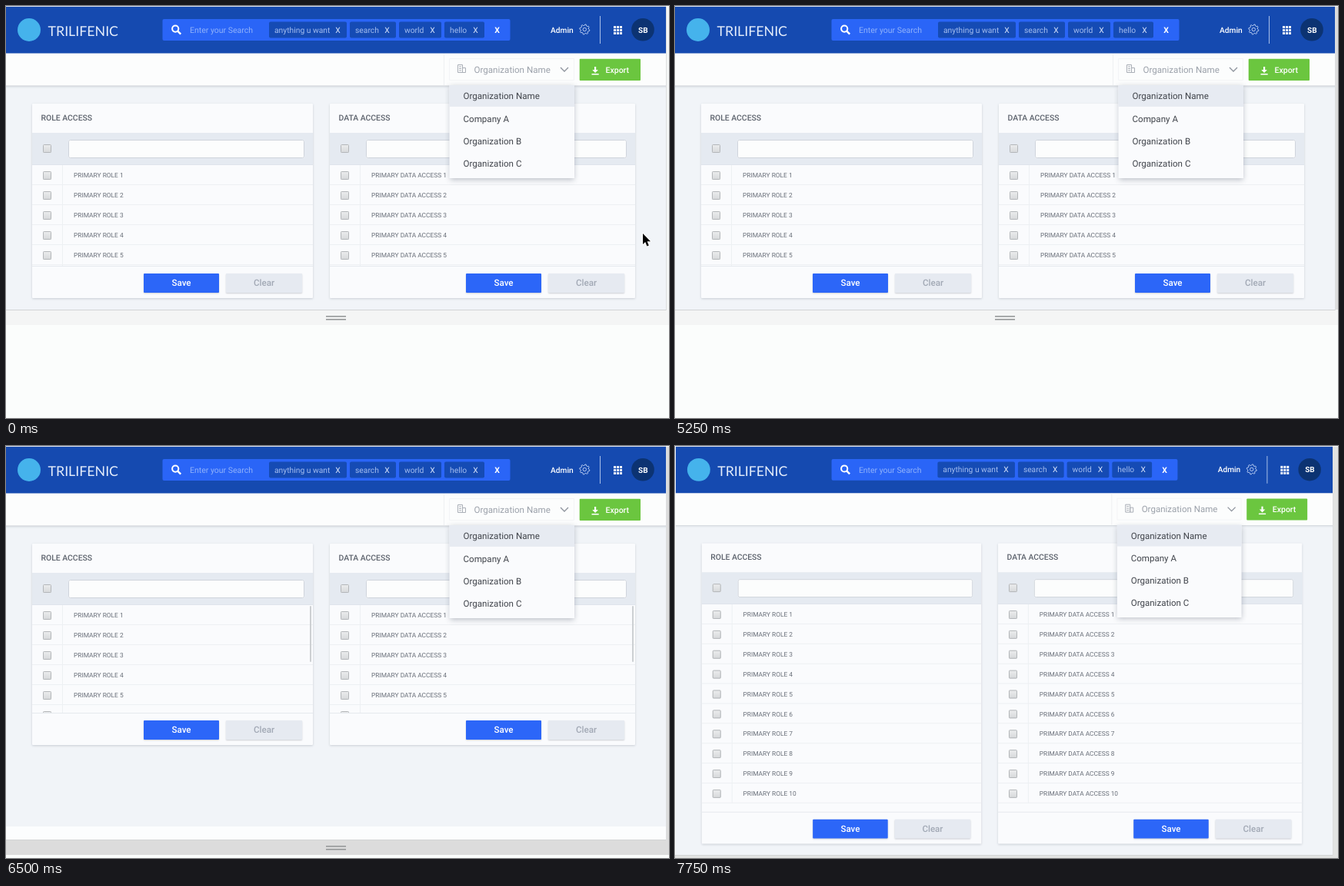
Animation of 862x536 px, one loop 8 s. Source, as an HTML page with a canvas:

```html
<!DOCTYPE html>
<html lang="en">
<head>
<meta charset="utf-8">
<title>Access panel resize</title>
<style>
html, body { margin: 0; width: 100%; height: 100%; overflow: hidden; background: #fbfdfc; }
canvas { display: block; }
</style>
</head>
<body>
<canvas id="stage" width="862" height="536"></canvas>
<script>
const ctx = document.getElementById('stage').getContext('2d');
const LOOP = 8000;
const FACE = 'Roboto, "Open Sans", sans-serif';
ctx.textRendering = 'geometricPrecision';

// Each step changes some of the layout values and keeps the rest.
const steps = [
  { at: 0, split: 395, paint: 395, list: 131, x: 0, scale: 1, right: 858,
    bar: '#f4f5f5', side: '#f5f7f6', thumb: 0, clip: 536, cursor: [828, 296] },
  { at: 250, cursor: [840, 405] },
  { at: 500, cursor: [857, 406] },
  { at: 750, cursor: null },
  { at: 5250, side: '#dcdcdc' },
  { at: 5500, bar: '#dcdcdc' },
  { at: 6000, split: 417 },
  { at: 6250, split: 484, paint: 464 },
  { at: 6500, split: 512, paint: 495, list: 140, thumb: 73 },
  { at: 6750, split: 532, paint: 514, list: 190, thumb: 133 },
  { at: 7000, x: 1, right: 855, paint: 532, list: 236, thumb: 212, clip: 466, bar: '#e2e3e2', side: '#e2e3e2' },
  { at: 7250, list: 271, thumb: 0, clip: 532 },
  { at: 7500, scale: 854 / 858 }
];

function stateAt(t) {
  return Object.assign({}, ...steps.filter(s => s.at <= t));
}

function rect(x, y, w, h, fill, r = 0) {
  ctx.fillStyle = fill;
  ctx.beginPath();
  ctx.roundRect(x, y, w, h, r);
  ctx.fill();
}

function frame(x, y, w, h, color, r = 0) {
  ctx.strokeStyle = color;
  ctx.lineWidth = 1;
  ctx.beginPath();
  ctx.roundRect(x + .5, y + .5, w - 1, h - 1, r);
  ctx.stroke();
}

function disc(x, y, r, fill) {
  ctx.fillStyle = fill;
  ctx.beginPath();
  ctx.arc(x, y, r, 0, Math.PI * 2);
  ctx.fill();
}

function path(points, color, width = 1) {
  ctx.strokeStyle = color;
  ctx.lineWidth = width;
  ctx.beginPath();
  points.forEach(p => ctx.lineTo(p[0], p[1]));
  ctx.stroke();
}

// y is the middle of the capital letters
function text(str, x, y, size, color, weight = 400, align = 'left', face = FACE) {
  ctx.font = `${weight} ${size}px ${face}`;
  ctx.fillStyle = color;
  ctx.textAlign = align;
  ctx.fillText(str, x, y + size * .355);
}

function shadowed(blur, dy, alpha, draw) {
  ctx.save();
  ctx.shadowColor = `rgba(40,50,70,${alpha})`;
  ctx.shadowBlur = blur;
  ctx.shadowOffsetY = dy;
  draw();
  ctx.restore();
}

function clipTo(x, y, w, h, draw) {
  ctx.save();
  ctx.beginPath();
  ctx.rect(x, y, w, h);
  ctx.clip();
  draw();
  ctx.restore();
}

function gear(x, y) {
  ctx.strokeStyle = '#b9cdf2';
  ctx.lineWidth = 1;
  ctx.beginPath();
  for (let i = 0; i < 32; i++) {
    const a = (i + .5) * Math.PI / 16;
    const r = i % 4 < 2 ? 6.6 : 5.1;
    ctx.lineTo(x + r * Math.cos(a), y + r * Math.sin(a));
  }
  ctx.closePath();
  ctx.stroke();
  ctx.beginPath();
  ctx.arc(x, y, 2.2, 0, 7);
  ctx.stroke();
}

function header() {
  rect(0, 1, 858, 60.5, '#154ab0');
  disc(30, 31, 15, '#45b3ec');
  text('TRILIFENIC', 54.5, 32.5, 17.8, '#e4edfb', 400, 'left', 'Lato, sans-serif');

  rect(203.5, 17, 452, 28, '#2a65f7', 2);
  ctx.strokeStyle = '#fff';
  ctx.lineWidth = 2;
  ctx.beginPath();
  ctx.arc(220.2, 29.6, 4.1, 0, 7);
  ctx.stroke();
  path([[223.2, 32.6], [227.2, 36.6]], '#fff', 2.4);
  text('Enter your Search', 239, 31, 10.5, '#90b2fb');

  const chips = [['anything u want', 342, 101], ['search', 447, 60], ['world', 511, 55], ['hello', 570, 52]];
  for (const [label, x, w] of chips) {
    rect(x, 20.5, w, 21, '#154bb4', 2);
    text(label, x + 7, 31, 10.3, '#a3bdf0');
    text('X', x + w - 11.5, 31, 10.3, '#dbe6fc', 400, 'center');
  }
  text('X', 638.5, 31.5, 10.5, '#fff', 700, 'center');

  text('Admin', 708, 31, 10.2, '#fff', 500);
  gear(752.3, 30.5);
  rect(772, 13, 1, 36, '#a9c0e8');
  for (let i = 0; i < 9; i++) rect(790 + i % 3 * 4, 26 + (i / 3 | 0) * 4, 3, 3, '#fff');
  disc(828, 30.8, 14.8, '#0c3372');
  text('SB', 828.3, 31, 10, '#fff', 700, 'center');
}

function toolbar() {
  shadowed(3, 1, .25, () => rect(-5, 61.5, 870, 42, '#fcfdfd'));
  header();
  rect(569, 62, 1, 41, '#eef0f2');
  frame(576, 68, 163, 29, '#f3f4f6');

  frame(587, 76, 7, 11, '#a9aeb6');
  frame(593, 80, 5, 7, '#a9aeb6');
  for (let i = 0; i < 3; i++) rect(589, 78.5 + i * 2.5, 3, 1, '#a9aeb6');

  text('Organization Name', 608.5, 82.5, 11.6, '#9ba1aa');
  path([[721, 80], [726, 85], [731, 80]], '#8d939c', 1.3);

  rect(745.7, 68.7, 79.3, 28.3, '#6bc63f', 1);
  rect(765, 79, 2.2, 5, '#fff');
  ctx.beginPath();
  ctx.moveTo(762.3, 83);
  ctx.lineTo(769.9, 83);
  ctx.lineTo(766.1, 87);
  ctx.fill();
  rect(761.5, 88, 9.2, 1.5, '#fff');
  text('Export', 779.5, 83, 10.5, '#fff', 500);
}

function checkbox(x, y) {
  const g = ctx.createLinearGradient(0, y - 5, 0, y + 6);
  g.addColorStop(0, '#ecedee');
  g.addColorStop(1, '#d6d8da');
  rect(x, y - 5, 11, 11, g, 1);
  frame(x, y - 5, 11, 11, '#b3b6b9', 1);
}

function button(label, x, y, w, fill, color) {
  shadowed(2, 1, .22, () => rect(x, y, w, 25, fill, 1));
  text(label, x + w / 2, y + 12.3, 11.6, color, 500, 'center');
}

function panel(p, s) {
  const end = 207 + s.list;
  shadowed(3, 1, .2, () => rect(p.x, 127, p.w, end + 42 - 127, '#fafbfd', 1));
  text(p.title, p.x + 11.5, 145.5, 10.4, '#5d636d', 500);
  rect(p.x, 165, p.w, 42, '#e5eaf1');
  rect(p.x, 206, p.w, 1, '#dfe4ec');
  checkbox(p.x + 14, 185);
  rect(p.x + 47, 174, p.input, 24, '#fcfdfd', 2);
  frame(p.x + 47, 174, p.input, 24, '#cfd4dc', 2);

  clipTo(p.x, 207, p.w, s.list, () => {
    rect(p.x + 39, 207, 1, 260, '#edf0f3');
    for (let i = 0; i < 10; i++) {
      const y = 220 + i * 26;
      checkbox(p.x + 14, y);
      text(`${p.row} ${i + 1}`, p.x + 54, y + .2, 8.4, '#686e78');
      rect(p.x, y + 12, p.w, 1, '#edf0f3');
    }
    if (s.thumb) rect(p.x + p.w - 4, 208, 2, s.thumb, '#cdd0d3', 1);
  });

  rect(p.x, end, p.w, 1, '#e5e9ee');
  button('Save', p.save, end + 10, 98, '#2c66f8', '#fff');
  button('Clear', p.save + 107, end + 10, 99, '#e6eaf1', '#a2a9b5');
}

const panels = [
  { x: 34, w: 365, title: 'ROLE ACCESS', row: 'PRIMARY ROLE', input: 307, save: 179 },
  { x: 421, w: 397, title: 'DATA ACCESS', row: 'PRIMARY DATA ACCESS', input: 339, save: 598 }
];

function dropdown() {
  shadowed(7, 2, .3, () => rect(576.5, 103, 162.5, 121, '#fafbfd'));
  rect(576.5, 103, 162.5, 28, '#e7ebf2');
  ['Organization Name', 'Company A', 'Organization B', 'Organization C'].forEach((name, i) =>
    text(name, 594.5, 117 + i * 29.4, 11.6, '#40444b'));
}

function arrow(x, y) {
  ctx.save();
  ctx.translate(x, y);
  ctx.beginPath();
  [[0, 0], [0, 14], [3.2, 11], [5.4, 16.4], [7.8, 15.4], [5.6, 10.2], [10, 10.2]].forEach(p => ctx.lineTo(...p));
  ctx.closePath();
  ctx.lineJoin = 'round';
  ctx.strokeStyle = '#fff';
  ctx.lineWidth = 2;
  ctx.stroke();
  ctx.fillStyle = '#000';
  ctx.fill();
  ctx.restore();
}

function draw(t) {
  const s = stateAt(t);
  rect(0, 0, 862, 536, '#fbfdfc');
  rect(s.right, 1, 862 - s.right, s.split, s.side);
  rect(0, s.split, 862, 20, s.bar);
  rect(0, s.split, s.right, 1, '#d2d4d5');
  rect(s.right, 1, 1, s.split, '#dcdedf');
  for (const dy of [8, 12]) rect(416, s.split + dy, 26, 1.6, '#969899');

  clipTo(s.x, 0, s.right - s.x, s.split, () => {
    rect(0, 0, 862, s.split, '#fcfdfe');
    rect(0, 0, 862, 1, '#dfe5ee');
    ctx.translate(s.x, 0);
    ctx.scale(s.scale, s.scale);
    rect(0, 61, 862, s.paint / s.scale - 61, '#f1f4f8');
    clipTo(0, 0, 862, s.clip, () => panels.forEach(p => panel(p, s)));
    toolbar();
    dropdown();
  });
  if (s.cursor) arrow(...s.cursor);
}

function tick() {
  draw(performance.now() % LOOP);
  requestAnimationFrame(tick);
}
tick();
</script>
</body>
</html>
```
